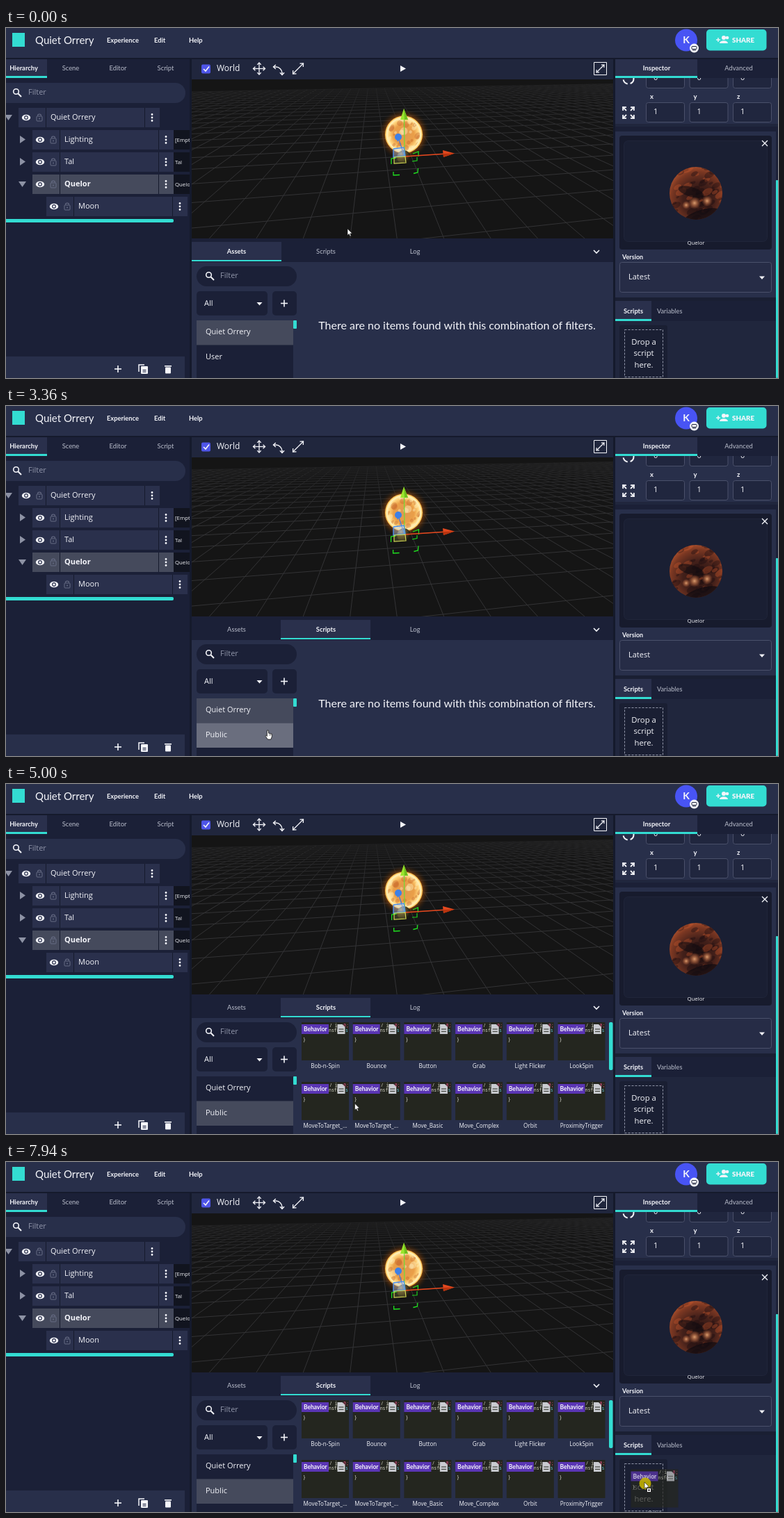
An HTML page with a canvas that plays this animation: 1110 px wide and 504 px high, repeating every 8 s.

```html
<!DOCTYPE html>
<html lang="en">
<head>
<meta charset="utf-8">
<title>Scene editor</title>
<style>
html, body { margin: 0; width: 100%; height: 100%; overflow: hidden; background: #1b2037; }
canvas { display: block; }
</style>
</head>
<body>
<canvas id="stage" width="1110" height="504"></canvas>
<script>
const g = document.getElementById('stage').getContext('2d');
const LOOP = 8000, STEP = 60, TAU = Math.PI * 2;
const PANEL = '#282f4a', DARK = '#1b2037', ROW = '#2a304c', TEAL = '#33dcd2';
const WHITE = '#f4f5fa', GREY = '#b9bdcb', LINE = '#4a506a', PICK = '#454a5c';
const WORLD = 'Quiet Orrery', PLANET = 'Quelor', STAR = 'Tal';

const sans = (n, w = 400) => `${w} ${n}px "Open Sans", "Noto Sans", sans-serif`;
const lato = (n, w = 400) => `${w} ${n}px Lato, "Open Sans", sans-serif`;

function rect(x, y, w, h, fill, r = 0, stroke) {
  g.beginPath();
  g.roundRect(x, y, w, h, r);
  if (fill) { g.fillStyle = fill; g.fill(); }
  if (stroke) { g.strokeStyle = stroke; g.lineWidth = 1; g.stroke(); }
}
function text(s, x, y, font, color = WHITE, align = 'left') {
  g.font = font;
  g.fillStyle = color;
  g.textAlign = align;
  g.textBaseline = 'middle';
  g.fillText(s, x, y);
}
function line(points, color, width = 1) {
  g.beginPath();
  for (let i = 0; i < points.length; i += 2) g.lineTo(points[i], points[i + 1]);
  g.strokeStyle = color;
  g.lineWidth = width;
  g.stroke();
}
function poly(points, fill) {
  g.beginPath();
  for (let i = 0; i < points.length; i += 2) g.lineTo(points[i], points[i + 1]);
  g.closePath();
  g.fillStyle = fill;
  g.fill();
}
function disc(x, y, r, fill) {
  g.beginPath();
  g.arc(x, y, r, 0, TAU);
  g.fillStyle = fill;
  g.fill();
}
function oval(x, y, rx, ry, tilt, fill) {
  g.beginPath();
  g.ellipse(x, y, rx, ry, tilt, 0, TAU);
  g.fillStyle = fill;
  g.fill();
}
function ring(x, y, r, color, width, from = 0, to = TAU) {
  g.beginPath();
  g.arc(x, y, r, from, to);
  g.strokeStyle = color;
  g.lineWidth = width;
  g.stroke();
}
function radial(x, y, r, stops) {
  const fill = g.createRadialGradient(x, y, 0, x, y, r);
  stops.forEach(([at, color]) => fill.addColorStop(at, color));
  return fill;
}
function clipped(shape, draw) {
  g.save();
  g.beginPath();
  shape();
  g.clip();
  draw();
  g.restore();
}
function seeded(n) {
  return () => (n = (n * 16807) % 2147483647) / 2147483647;
}

// ---- icons ----
function eye(x, y) {
  oval(x, y, 6.2, 4.3, 0, WHITE);
  disc(x, y, 2.9, ROW);
  disc(x, y, 1.7, WHITE);
}
function lock(x, y) {
  rect(x - 4, y - 2, 8, 7, null, 1, '#666c84');
  ring(x, y - 2.5, 2.5, '#666c84', 1.2, Math.PI, TAU);
  disc(x, y + 1.5, 1, '#666c84');
}
function dots(x, y) {
  for (const d of [-4.5, 0, 4.5]) disc(x, y + d, 1.4, WHITE);
}
function lens(x, y) {
  ring(x - 1.5, y - 1.5, 3.8, WHITE, 1.6);
  line([x + 1.5, y + 1.5, x + 6, y + 6], WHITE, 2);
}
function plus(x, y) {
  line([x - 5, y, x + 5, y], WHITE, 1.6);
  line([x, y - 5, x, y + 5], WHITE, 1.6);
}
function caret(x, y) {
  poly([x - 4, y - 2, x + 4, y - 2, x, y + 2.5], WHITE);
}
function arrowLine(x1, y1, x2, y2, color, width, head) {
  line([x1, y1, x2, y2], color, width);
  const a = Math.atan2(y2 - y1, x2 - x1);
  const p = s => [x2 - head * Math.cos(a + s), y2 - head * Math.sin(a + s)];
  line([...p(0.75), x2, y2, ...p(-0.75)], color, width);
}
function page(x, y) {
  poly([x - 5, y - 7, x + 2, y - 7, x + 6, y - 3, x + 6, y + 7, x - 5, y + 7], '#c9cbd0');
  line([x - 3, y, x + 4, y], '#44463f', 1.2);
  line([x - 3, y + 3.5, x + 4, y + 3.5], '#44463f', 1.2);
}

// ---- panels ----
function tabBar(items, y) {
  for (const [label, x, on] of items)
    text(label, x, y, lato(9.4, on ? 700 : 400), on ? WHITE : GREY, 'center');
}
function header() {
  rect(0, 0, 1110, 43, PANEL);
  rect(9, 7, 18, 20, TEAL);
  text(WORLD, 42, 18, lato(15));
  [['Experience', 145], ['Edit', 213], ['Help', 263]].forEach(([s, x]) => text(s, x, 18, lato(9.3, 700)));
  disc(978, 17.5, 16, '#4854f4');
  text('K', 978, 18, lato(14, 700), WHITE, 'center');
  disc(989.5, 29, 6.5, WHITE);
  rect(986, 26.5, 7, 4, null, 1, '#20263d');
  line([987, 32, 992, 32], '#20263d');
  rect(1007, 2, 86.5, 30.5, TEAL, 5);
  disc(1032, 14, 3, WHITE);
  g.beginPath();
  g.ellipse(1032, 22, 6, 3.8, 0, Math.PI, TAU);
  g.fill();
  disc(1037, 14, 2.3, WHITE);
  line([1021, 17, 1027, 17], WHITE, 1.4);
  line([1024, 14, 1024, 20], WHITE, 1.4);
  text('SHARE', 1044, 18, lato(9.8, 900));
}
function treeRow(x, y, label, side, open, picked) {
  const fill = picked ? PICK : ROW;
  if (side !== undefined) rect(x + 203, y - 14, 264 - x - 203, 28, '#11141f');
  rect(x, y - 14, 203, 28, fill);
  for (const d of [39, 181]) line([x + d + 0.5, y - 14, x + d + 0.5, y + 14], '#151a2c');
  eye(x + 11, y);
  lock(x + 30, y);
  text(label, x + 46, y, sans(11, picked ? 700 : 400));
  dots(x + 192, y);
  if (open === true) poly([x - 20, y - 4, x - 9, y - 4, x - 14.5, y + 4], '#8d92a4');
  if (open === false) poly([x - 18, y - 6, x - 10, y - 0.5, x - 18, y + 5], '#8d92a4');
  if (side) clipped(() => g.rect(0, y - 14, 264, 28), () => text(side, x + 205, y + 0.5, sans(7.8)));
}
function leftPanel() {
  rect(0, 45, 264, 459, DARK);
  rect(0, 45, 59, 25, ROW);
  rect(0, 69, 59, 3, TEAL);
  tabBar([['Hierarchy', 25.5, true], ['Scene', 93], ['Editor', 161], ['Script', 229.5]], 58);
  rect(-16, 79, 274, 29, PANEL, 14.5);
  lens(16, 93);
  text('Filter', 32, 93.5, sans(11), '#8f94a8');
  treeRow(18, 129, WORLD, undefined, true);
  treeRow(38, 161, 'Lighting', '[Empty]', false);
  treeRow(38, 193, STAR, STAR, false);
  treeRow(38, 225, PLANET, PLANET, true, true);
  treeRow(58, 257, 'Moon');
  rect(-4, 275, 245, 5, TEAL, 2);
  rect(0, 473, 257, 31, PANEL);
  plus(161, 491);
  line([191, 495, 191, 485, 199, 485], WHITE, 1.5);
  rect(194, 487, 10, 11, WHITE, 1);
  rect(196.5, 492, 5, 1.2, PANEL);
  rect(196.5, 494.5, 5, 1.2, PANEL);
  rect(229, 488.5, 8, 9, WHITE, 1);
  rect(228, 486, 10, 1.6, WHITE);
}
function field(x, y) {
  rect(x + 0.5, y + 0.5, 55, 28, '#20263e', 3, LINE);
}
function planet() {
  clipped(() => g.arc(992, 238, 38, 0, TAU), () => {
    g.fillStyle = radial(996, 246, 46, [[0, '#2a1412'], [0.5, '#43201a'], [0.85, '#7a3722'], [1, '#a04a2a']]);
    g.fillRect(950, 196, 84, 84);
    const rnd = seeded(77);
    for (let i = 0; i < 60; i++) {
      const x = 954 + rnd() * 76, y = 200 + rnd() * 76, r = 2 + rnd() * 7;
      oval(x, y, r, r * 0.55, -0.5, i % 3 ? 'rgba(20,11,14,.36)' : 'rgba(205,90,46,.34)');
    }
    oval(985, 236, 19, 7, 0.3, 'rgba(16,11,16,.6)');
    oval(1000, 270, 26, 8, -0.3, 'rgba(16,11,16,.75)');
    [[990, 252, 9], [1008, 249, 8], [978, 255, 6]].forEach(([x, y, r]) =>
      disc(x, y, r, radial(x, y, r, [[0, 'rgba(236,172,122,.9)'], [0.4, 'rgba(210,130,84,.6)'], [1, 'rgba(190,100,60,0)']])));
  });
}
function rightPanel() {
  rect(876, 45, 234, 459, DARK);
  rect(876, 45, 118, 25, ROW);
  rect(876, 69, 118, 3, TEAL);
  tabBar([['Inspector', 935.5, true], ['Advanced', 1053.5]], 58);
  rect(876, 72, 234, 66, PANEL);
  clipped(() => g.rect(876, 72, 234, 66), () => {
    g.setLineDash([9, 4]);
    ring(895, 73, 7.5, WHITE, 2);
    g.setLineDash([]);
    ['x', 'y', 'z'].forEach((axis, i) => {
      const x = 920 + i * 62.5;
      field(x, 58);
      text('0', x + 11, 72, sans(11));
      text(axis, x + 6, 99, lato(9.5, 700));
      field(x, 107);
      text('1', x + 11, 121.5, sans(11));
    });
    for (const sx of [-1, 1]) for (const sy of [-1, 1])
      arrowLine(895 + sx * 3, 122 + sy * 3, 895 + sx * 8, 122 + sy * 8, WHITE, 1.8, 5);
  });
  rect(876, 138, 234, 4, '#20263d');
  rect(876, 149, 231, 239, PANEL);
  rect(882, 155, 219, 164, '#171b2d', 4);
  rect(888.5, 162.5, 206, 145, '#1a1f33', 6, '#20253a');
  line([1087, 162, 1095, 170], WHITE, 1.3);
  line([1095, 162, 1087, 170], WHITE, 1.3);
  planet();
  text(PLANET, 992, 309.5, sans(7.8), WHITE, 'center');
  text('Version', 886, 330.5, lato(9, 700));
  rect(882.5, 337.5, 218, 43, '#262c46', 3, LINE);
  text('Latest', 895, 359.5, sans(11));
  caret(1087, 359.5);
  rect(876, 388, 231, 5, '#1a1f33');
  rect(876, 393, 52, 28, ROW);
  rect(876, 419, 52, 3, TEAL);
  text('Scripts', 888, 408, lato(9.3, 700));
  text('Variables', 936, 408, lato(9.2), GREY);
  rect(876, 422, 231, 82, '#20263d');
  rect(882, 428, 69, 80, '#1a1f33', 3);
  g.setLineDash([3, 2]);
  rect(889.5, 434.5, 55, 68, null, 0, '#9095a8');
  g.setLineDash([]);
  ['Drop a', 'script', 'here.'].forEach((s, i) => text(s, 917, 453 + i * 16.3, sans(11.3), WHITE, 'center'));
  rect(1107, 219, 3, 285, TEAL, 1);
}

// ---- 3D view ----
const cam = { x: 570, y: 188, f: 290, pitch: 0.47, yaw: 0.135, h: 3.5 };
function ground(x, z) {
  const side = x * Math.cos(cam.yaw) - z * Math.sin(cam.yaw);
  const fwd = x * Math.sin(cam.yaw) + z * Math.cos(cam.yaw);
  return [side, fwd * Math.cos(cam.pitch) + cam.h * Math.sin(cam.pitch),
    fwd * Math.sin(cam.pitch) - cam.h * Math.cos(cam.pitch)];
}
function groundLine(a, b) {
  if (a[1] > b[1]) [a, b] = [b, a];
  const near = 0.4;
  if (b[1] < near) return;
  if (a[1] < near) {
    const k = (near - a[1]) / (b[1] - a[1]);
    a = a.map((v, i) => v + (b[i] - v) * k);
  }
  const at = p => [cam.x + cam.f * p[0] / p[1], cam.y - cam.f * p[2] / p[1]];
  line([...at(a), ...at(b)], '#333335');
}
function sun(t) {
  const x = 572, y = 153.5;
  disc(x, y, 37, radial(x, y, 37, [[0.62, 'rgba(255,140,25,.8)'], [0.78, 'rgba(150,72,10,.42)'], [1, 'rgba(50,30,5,0)']]));
  disc(x, y, 27, radial(x, y, 27, [[0, '#e0974f'], [0.55, '#ea9f48'], [0.78, '#ffd27a'], [0.9, '#fff3bd'], [1, '#ffb53c']]));
  clipped(() => g.arc(x, y, 23, 0, TAU), () => {
    const rnd = seeded(41);
    for (let i = 0; i < 60; i++) {
      const a = rnd() * TAU + t * 0.00008, lat = rnd() * 2 - 1, r = 1.5 + rnd() * 4, tone = rnd();
      if (Math.cos(a) < 0) continue;
      oval(x + Math.sin(a) * 23 * Math.sqrt(1 - lat * lat), y + lat * 23, r * (0.3 + 0.7 * Math.cos(a)), r, 0.6,
        tone > 0.55 ? 'rgba(255,240,190,.42)' : 'rgba(190,92,36,.36)');
    }
  });
}
function gizmo(t) {
  const sway = Math.sin(t * 0.0017);
  disc(572, 186, 10, radial(568, 181, 14, [[0, '#9a937c'], [0.5, '#5a4a2a'], [1, '#1c190f']]));
  const green = '#1fe01f';
  const l = 557 + sway * 0.8, r = 593 - sway * 0.8;
  line([l, 207, l, 212, l + 9, 211.5], green, 1.3);
  line([r - 7, 209.5, r - 1, 208, r - 0.5, 202 + sway], green, 1.3);
  line([585, 181, r, 178, r, 185], green, 1.3);
  line([l - 3, 196, l - 3, 188, l + 4, 187], green, 1.3);
  line([584, 192, 591, 191 + sway, 591, 186], green, 1.1);
  line([573, 185, 572.5, 131], '#76d83a', 1.3);
  line([573, 185, 564, 158], '#4a78d8', 1.3);
  line([573, 185, 630, 181.3], '#e8471c', 1.5);
  poly([572, 116, 567, 132, 578, 132], '#9be52d');
  poly([572, 116, 573, 132, 578, 132], '#6fbf1e');
  poly([645, 180.5, 628, 176, 629, 186], '#e2481f');
  poly([645, 180.5, 628.5, 181, 629, 186], '#b9340f');
  disc(564, 157, 5, '#3e80e6');
  poly([560, 155, 568, 155, 563, 164], '#3e80e6');
  poly([557, 174, 572, 172, 574, 184, 557, 186], 'rgba(190,210,235,.4)');
  line([557, 174, 572, 172, 574, 184, 557, 186, 557, 174], '#4b91ef', 1.4);
  poly([558, 186, 574, 185, 575, 194, 558, 195], 'rgba(190,190,90,.2)');
  line([558, 186, 574, 185, 575, 194, 558, 195, 558, 186], '#d3d957', 1.2);
}
function view(t) {
  rect(267, 45, 606, 29, '#20263d');
  rect(281, 52.5, 13, 13, '#4e55e8', 2);
  line([284, 59, 287, 62, 292, 55.5], WHITE, 1.6);
  text('World', 303, 59, sans(12));
  for (const [dx, dy] of [[1, 0], [-1, 0], [0, 1], [0, -1]])
    arrowLine(364, 58.5, 364 + dx * 8.5, 58.5 + dy * 8.5, WHITE, 1.3, 4);
  ring(388, 65, 9, WHITE, 1.4, -Math.PI / 2, 0);
  arrowLine(388, 56, 384.5, 56, WHITE, 1.4, 4.5);
  arrowLine(397, 64, 397, 67.5, WHITE, 1.4, 4.5);
  arrowLine(420, 58.5, 412.5, 66, WHITE, 1.3, 5);
  arrowLine(420, 58.5, 427.5, 51, WHITE, 1.3, 5);
  poly([567, 54, 575, 58.5, 567, 63], WHITE);
  rect(845.5, 49.5, 18, 18, null, 0, WHITE);
  arrowLine(854.5, 58.5, 860, 53, WHITE, 1.2, 4);
  arrowLine(854.5, 58.5, 849, 64, WHITE, 1.2, 4);
  clipped(() => g.rect(267, 74, 606, 229), () => {
    g.fillStyle = '#151515';
    g.fillRect(267, 74, 606, 229);
    for (let i = -26; i <= 40; i++) {
      groundLine(ground(i + 0.3, -6), ground(i + 0.3, 26));
      if (i > -7 && i < 27) groundLine(ground(-26, i), ground(40, i));
    }
    const fade = g.createLinearGradient(0, 74, 0, 170);
    fade.addColorStop(0, 'rgba(21,21,21,.6)');
    fade.addColorStop(1, 'rgba(21,21,21,0)');
    g.fillStyle = fade;
    g.fillRect(267, 74, 606, 100);
    sun(t);
    gizmo(t);
  });
}

// ---- asset browser ----
const SCRIPTS = ['Bob-n-Spin', 'Bounce', 'Button', 'Grab', 'Light Flicker', 'LookSpin',
  'MoveToTarget_...', 'MoveToTarget_...', 'Move_Basic', 'Move_Complex', 'Orbit', 'ProximityTrigger'];
function card(x, y, label) {
  rect(x, y, 68, 55, '#24261f');
  const code = '500 6.5px "Noto Sans Mono", monospace';
  text('/ i', x + 40, y + 5, code, '#d8d8c8');
  text('0;', x + 60, y + 5, code, '#d94f7c');
  text('nsfo', x + 39, y + 12.5, code, '#d8d8c8');
  text('s', x + 63, y + 12.5, code, '#62c4da');
  text('}', x + 2, y + 25.5, code, '#e4e4d8');
  rect(x, y + 3, 39, 14, '#5a35b4');
  text('Behavior', x + 3, y + 10.5, lato(8.5, 700));
  page(x + 56.5, y + 10);
  text(label, x + 34, y + 64, sans(8.1), WHITE, 'center');
}
function assets(state) {
  rect(267, 303, 606, 34, DARK);
  const tabX = state.scripts ? 395 : 267;
  rect(tabX, 308, 129, 28, ROW);
  rect(tabX, 334, 129, 2, TEAL);
  tabBar([['Assets', 331.5, !state.scripts], ['Scripts', 460, state.scripts], ['Log', 588]], 322);
  line([845, 320, 849, 324, 853, 320], WHITE, 1.6);
  rect(267, 337, 606, 167, PANEL);
  rect(274, 343, 144, 29, DARK, 14.5);
  lens(293, 357);
  text('Filter', 308, 357.5, sans(11), '#8f94a8');
  rect(274, 379, 102, 35, DARK, 5);
  text('All', 285, 397, sans(11));
  caret(364.5, 397);
  rect(383, 379, 35, 35, DARK, 5);
  plus(400, 396.5);
  rect(274, 421, 139, 83, DARK);
  [WORLD, state.scripts ? 'Public' : 'User'].forEach((s, i) => {
    const y = 421 + i * 35.5;
    const on = i === (state.pub ? 1 : 0);
    if (on || state.hover === i) rect(274, y, 139, 35.5, state.hover === i && !state.pub ? '#6a6e7e' : PICK);
    text(s, 287, y + 17.5, sans(11));
  });
  rect(413, 421, 5, 12, TEAL, 1);
  if (state.loaded) {
    SCRIPTS.forEach((s, i) => card(425 + (i % 6) * 73.7, i < 6 ? 343 : 429, s));
    rect(867, 343, 5.5, 69, TEAL, 2);
  } else {
    text('There are no items found with this combination of filters.', 648.5, 429.5, lato(16), WHITE, 'center');
  }
}

// ---- pointer ----
const PATH = [[0, 491, 289], [300, 491, 289], [1080, 492, 316], [1320, 491, 313], [1620, 491, 313],
  [1800, 491, 314.5], [2460, 491, 314.5], [3180, 385, 462], [3600, 363, 475], [4080, 363, 475.5], [4440, 363, 475.5],
  [5000, 502, 460], [5300, 556, 461], [6080, 756, 465], [6200, 757, 465], [6500, 777, 465],
  [6920, 745, 452], [7280, 875.5, 473], [7760, 919, 463], [LOOP, 919, 463]];
function pointer(t) {
  const i = Math.max(1, PATH.findIndex(p => p[0] > t));
  const [t0, x0, y0] = PATH[i - 1], [t1, x1, y1] = PATH[i];
  const k = (t - t0) / (t1 - t0), e = k * k * (3 - 2 * k);
  return [x0 + (x1 - x0) * e, y0 + (y1 - y0) * e];
}
function arrow(x, y) {
  poly([x, y, x, y + 9.5, x + 2.2, y + 7.6, x + 3.7, y + 11, x + 5.2, y + 10.3, x + 3.8, y + 7, x + 6.7, y + 6.8], '#fff');
  g.strokeStyle = '#111';
  g.lineWidth = 0.6;
  g.stroke();
}
function hand(x, y) {
  poly([x - 1, y, x + 1, y, x + 1.2, y + 4, x + 6, y + 5.3, x + 6, y + 9, x + 4.5, y + 13, x, y + 13,
    x - 3.5, y + 8, x - 2.5, y + 7, x - 1, y + 8.5], '#fff');
  g.strokeStyle = '#111';
  g.lineWidth = 0.8;
  g.stroke();
  for (const d of [2.3, 4.1]) line([x + d, y + 5.5, x + d, y + 7.5], '#111', 0.6);
}
function drag(x, y) {
  g.globalAlpha = 0.72;
  card(x - 20.5, y - 20.5, 'Orbit');
  g.globalAlpha = 0.85;
  disc(x, y, 8.5, '#c9b800');
  g.globalAlpha = 1;
  if (x > 889) {
    arrow(x - 1, y - 2);
    rect(x + 2.5, y + 6.5, 6, 6, '#fff', 0, '#222');
    line([x + 4, y + 9.5, x + 7, y + 9.5], '#222');
    line([x + 5.5, y + 8, x + 5.5, y + 11], '#222');
  } else {
    ring(x, y, 4.6, '#26260c', 1.6);
    line([x - 3.2, y - 3.2, x + 3.2, y + 3.2], '#26260c', 1.6);
  }
}

const HOLDS = [[0, 300], [1320, 1620], [4080, 4440]];
function settle(t) {
  const hold = HOLDS.find(([a, b]) => t >= a && t < b);
  return hold ? hold[0] : Math.floor(t / STEP) * STEP;
}
function draw(t) {
  const [x, y] = pointer(t);
  const inList = x > 274 && x < 413 && y > 421;
  const state = {
    scripts: t >= 1620,
    pub: t >= 4440,
    loaded: t >= 4680,
    hover: inList ? (y < 456 ? 0 : 1) : -1
  };
  rect(0, 0, 1110, 504, '#151a2c');
  header();
  leftPanel();
  view(t);
  assets(state);
  rightPanel();
  const overTab = y > 308 && y < 336;
  if (t >= 6960) drag(x, y);
  else if (inList || overTab) hand(x, y);
  else arrow(x, y);
}
function tick() {
  draw(settle(performance.now() % LOOP));
  requestAnimationFrame(tick);
}
tick();
</script>
</body>
</html>
```
